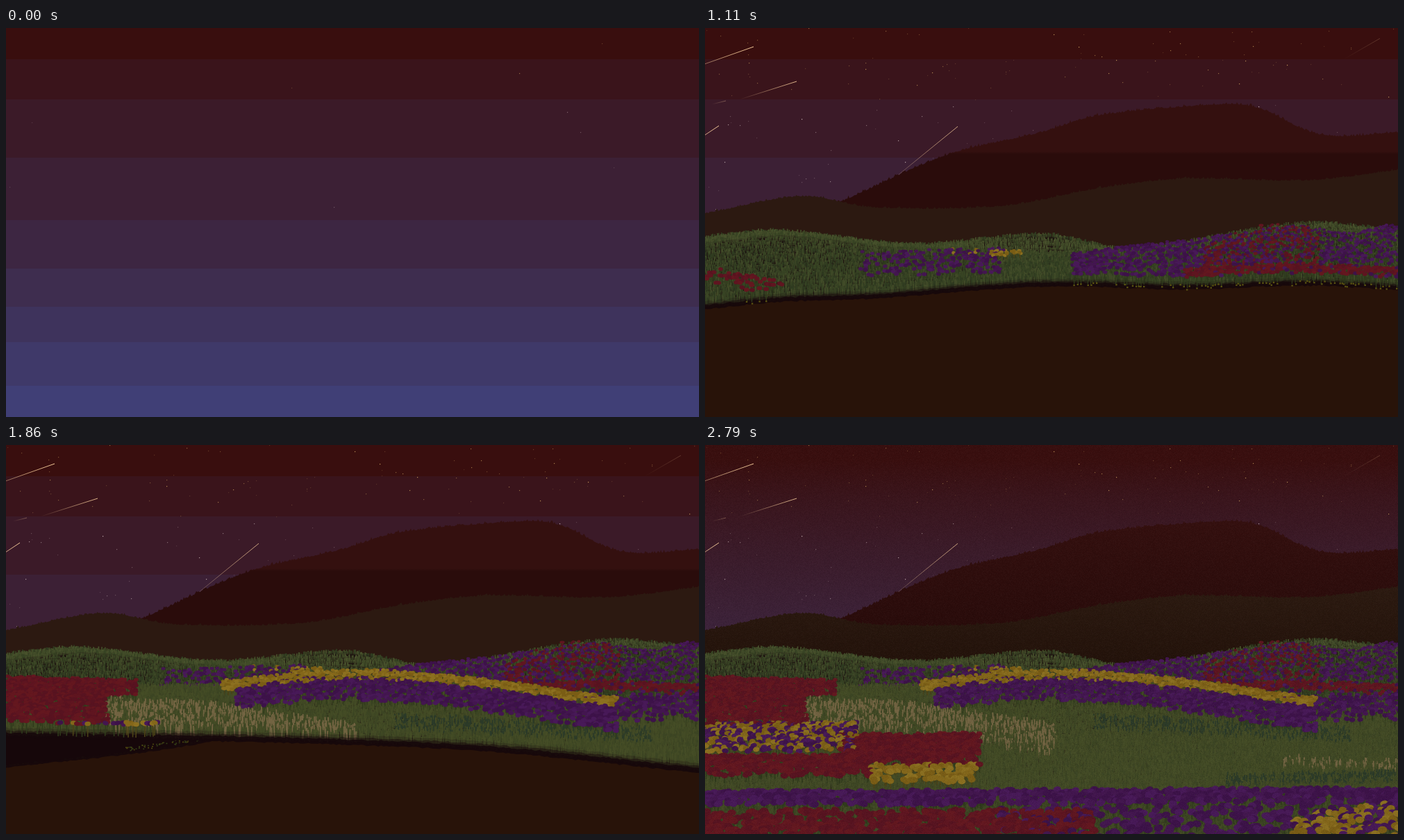
An HTML page with a canvas that plays this animation: 998x561 px, repeating every 9 s.

```html
<!DOCTYPE html>
<html lang="en">
<head>
<meta charset="utf-8">
<title>Night meadow</title>
<style>
html, body { margin: 0; width: 100%; height: 100%; overflow: hidden; background: #281309; }
canvas { display: block; width: 998px; height: 561px; }
</style>
</head>
<body>
<canvas id="stage" width="998" height="561"></canvas>
<script>
const W = 998, H = 561, LOOP = 9000, TICK = 30, LAST = 93, ROW = 15;

function layer(w, h) {
  const c = document.createElement('canvas');
  c.width = w;
  c.height = h;
  return c;
}
const ctx = document.getElementById('stage').getContext('2d');
const land = layer(W, H), g = land.getContext('2d');

function rng(seed) {
  let a = seed * 7919 + 17;
  return () => {
    a = (a + 0x6D2B79F5) | 0;
    let t = Math.imul(a ^ (a >>> 15), 1 | a);
    t = (t + Math.imul(t ^ (t >>> 7), 61 | t)) ^ t;
    return ((t ^ (t >>> 14)) >>> 0) / 4294967296;
  };
}
const lerp = (a, b, k) => a + (b - a) * k;

// Smooth line through a few [x, y] points
function line(...p) {
  const n = p.length - 1;
  const slope = p.map((_, i) => {
    const a = p[Math.max(0, i - 1)], b = p[Math.min(n, i + 1)];
    return (b[1] - a[1]) / (b[0] - a[0]);
  });
  return x => {
    let i = 0;
    while (i < n - 1 && x > p[i + 1][0]) i++;
    const [x0, y0] = p[i], [x1, y1] = p[i + 1], d = x1 - x0;
    const k = Math.max(0, Math.min(1, (x - x0) / d)), q = 1 - k;
    return q * q * (1 + 2 * k) * y0 + k * k * (3 - 2 * k) * y1
      + d * k * q * (q * slope[i] - k * slope[i + 1]);
  };
}

function below(top, fuzz, seed) {
  const r = rng(seed), path = new Path2D();
  path.moveTo(-2, H);
  for (let x = -2; x <= W + 2; x += 1.5) path.lineTo(x, top(x) - r() * r() * fuzz);
  path.lineTo(W + 2, H);
  return path;
}

/* ---------- sky and far hills ---------- */
const EDGES = [0, 45, 103, 187, 277, 347, 402, 453, 516, H];
const bandColor = i => `rgb(${57 + 0.9 * i},${14 + 6.1 * i},${14 + 13 * i})`;

const mountain = below(line([0, 330], [195, 251], [350, 183], [480, 152], [560, 128],
  [690, 114], [790, 114], [885, 154], [1000, 151]), 5, 3);
const ridge = below(line([0, 268], [140, 243], [240, 259], [430, 257], [570, 231],
  [690, 218], [870, 220], [1000, 205]), 4, 4);

const starRand = rng(11);
const stars = Array.from({ length: 190 }, () => ({
  x: Math.floor(starRand() * W),
  y: Math.floor(starRand() * 280),
  a: 0.15 + 0.65 * starRand() ** 2
}));

// head, tail, strength
const METEORS = [
  [30, 105, 10, 110, 0.35],
  [20, 141, -60, 194, 0.95],
  [364, 142, 250, 235, 0.75],
  [607, 236, 525, 300, 0.4],
  [95, 274, -40, 342, 0.8],
  [70, 27, -60, 73, 0.95],
  [132, 77, 50, 103, 0.85],
  [972, 15, 920, 45, 0.2]
];

function fade(x0, y0, x1, y1, ...colors) {
  const s = ctx.createLinearGradient(x0, y0, x1, y1);
  colors.forEach((c, i) => s.addColorStop(i / (colors.length - 1), c));
  return s;
}

function drawSky(step) {
  const t = step * TICK, done = step === LAST;
  const smooth = ctx.createLinearGradient(0, 0, 0, H);
  for (let i = 0; i < EDGES.length - 1; i++) {
    smooth.addColorStop((EDGES[i] + EDGES[i + 1]) / 2 / H, bandColor(i));
    ctx.fillStyle = bandColor(i);
    ctx.fillRect(0, EDGES[i], W, H);
  }
  if (done) {
    ctx.fillStyle = smooth;
    ctx.fillRect(0, 0, W, H);
  }
  for (const { x, y, a } of stars.slice(0, 9 + step * 10)) {
    ctx.fillStyle = `rgba(${y < 110 ? '235,190,110' : '225,205,205'},${a})`;
    ctx.fillRect(x, y, 1.2, 1.2);
  }
  ctx.lineWidth = 1;
  METEORS.forEach(([x0, y0, x1, y1, a], i) => {
    if (t < 90 + i * 70) return;
    const c = y0 < 200 ? '255,212,160' : '230,210,225';
    ctx.strokeStyle = fade(x0, y0, x1, y1, `rgba(${c},${a})`, `rgba(${c},0)`);
    ctx.beginPath();
    ctx.moveTo(x0, y0);
    ctx.lineTo(x1, y1);
    ctx.stroke();
  });
  if (t >= 630) {
    ctx.fillStyle = done ? fade(0, 112, 0, 260, '#340f0e', '#290b0a') : fade(0, 178, 0, 182, '#34100f', '#2a0c0b');
    ctx.fill(mountain);
  }
  if (t >= 720) {
    ctx.fillStyle = done ? fade(0, 205, 0, 310, '#2c1a10', '#23120a') : '#2c1911';
    ctx.fill(ridge);
  }
}

/* ---------- meadow ---------- */
// A patch hangs down by depth from a line through its points
function patch(kind, density, depth, ...points) {
  return { kind, density, depth, top: line(...points), x0: points[0][0], x1: points[points.length - 1][0] };
}

const crest = line([0, 308], [100, 298], [300, 319], [490, 304], [610, 325], [860, 287], [1000, 298]);
const gapEnd = line([0, 460], [200, 438], [480, 396], [700, 403], [1000, 420]);
const bank = line([0, 394], [200, 379], [480, 350], [700, 357], [875, 384], [1000, 400]);

// Each hill sweeps its front row through the lines in keys
const HILLS = [
  {
    keys: [
      [810, crest],
      [870, line([0, 316], [110, 305], [280, 322], [600, 331], [700, 328], [870, 301], [1000, 306])],
      [1275, gapEnd]
    ],
    grass: ['#48522c', '#414b28', '#374323', '#2f3b20'],
    deepen: true,
    patches: [
      patch('R', 0.85, 15, [690, 348], [840, 339], [1000, 346]),
      patch('R', 0.3, 55, [715, 318], [800, 284], [885, 288]),
      patch('R', 0.5, 24, [0, 343], [112, 364]),
      patch('Y', 0.3, 10, [355, 318], [455, 321]),
      patch('P', 0.4, 36, [225, 322], [430, 317]),
      patch('P', 0.45, 90, [530, 324], [760, 296], [860, 284], [930, 295], [1000, 276])
    ]
  },
  {
    keys: [
      [1290, bank],
      [1380, line([0, 403], [200, 392], [480, 367], [700, 372], [850, 386], [1000, 410])]
    ],
    grass: ['#434c26', '#3d4724', '#384221'],
    patches: [
      patch('T', 0.7, 22, [860, 374], [1000, 372]),
      patch('Y', 0.9, 13, [0, 375], [200, 360], [480, 332], [700, 339], [875, 366])
    ]
  },
  {
    keys: [
      [1440, line([0, 349], [300, 355], [500, 339], [700, 355], [880, 381], [1000, 378])],
      [1860, line([0, 417], [400, 424], [700, 437], [1000, 468])],
      [2370, line([0, 524], [1000, 522])]
    ],
    grass: ['#454d26', '#434b25', '#404824', '#3c4523'],
    patches: [
      patch('W', 0.25, 44, [145, 364], [300, 372], [505, 402]),
      patch('W', 0.13, 14, [830, 450], [1000, 455]),
      patch('T', 0.45, 22, [560, 385], [930, 404]),
      patch('T', 0.5, 16, [750, 473], [1000, 468]),
      patch('Y', 0.9, 16, [310, 338], [500, 322], [700, 336], [880, 364]),
      patch('P', 0.8, 34, [332, 345], [500, 334], [700, 352], [880, 380]),
      patch('P', 0.5, 40, [835, 357], [1000, 358]),
      patch('R', 1, 72, [0, 332], [146, 332]),
      patch('R', 1, 28, [140, 332], [188, 332]),
      patch('M', 0.9, 42, [0, 401], [218, 399]),
      patch('R', 0.9, 30, [0, 447], [240, 447]),
      patch('Y', 0.5, 26, [237, 460], [392, 460]),
      patch('R', 1, 48, [190, 417], [395, 415])
    ]
  },
  {
    keys: [
      [2400, line([0, 527], [1000, 522])],
      [2760, line([0, 604], [1000, 604])]
    ],
    grass: ['#434b24', '#3d4623', '#384121'],
    patches: [
      patch('Y', 0.4, 80, [850, 534], [1000, 514]),
      patch('P', 0.9, 30, [0, 490], [1000, 486]),
      patch('R', 0.5, 80, [0, 526], [560, 526]),
      patch('P', 0.25, 80, [420, 520], [1000, 518])
    ]
  }
];
const BLOOM = {
  P: ['#43164f', '#3d1249', '#481958'],
  R: ['#5f1520', '#581320', '#64171f'],
  Y: ['#84671a', '#7a5d15', '#8c7020']
};
const TINT = { W: '#736442', T: '#2b3a28' };

// Patches thin out toward their lower edge
function pick(patches, x, y, r) {
  for (const p of patches) {
    if (x < p.x0 || x > p.x1) continue;
    const k = (y - p.top(x)) / p.depth;
    if (k >= 0 && k <= 1 && r() < p.density * (1 - 0.6 * k * k)) return p.kind;
  }
}

function front(keys, t) {
  let i = 0;
  while (i < keys.length - 2 && t > keys[i + 1][0]) i++;
  const [t0, a] = keys[i], [t1, b] = keys[i + 1], k = (t - t0) / (t1 - t0);
  return x => lerp(a(x), b(x), k);
}

const tall = y => 8 + Math.max(0, y - 290) * 0.05;

function drawGrass(hill, t, base, r) {
  const tints = hill.patches.filter(p => TINT[p.kind]);
  const n = hill.grass.length, blades = {};
  const deep = hill.deepen ? Math.min(1.5, (t - hill.keys[0][0]) / 80) : 0;
  for (let x = -2; x < W + 2; x += 1.5) {
    const y = base(x), h = tall(y), kind = pick(tints, x, y - h, r);
    const shade = Math.min(n - 1, Math.floor(r() * (deep ? 2 : n) + deep));
    const p = blades[TINT[kind] || hill.grass[shade]] ??= new Path2D();
    const len = h * (0.65 + r() * 0.5 + (kind === 'W' ? 0.25 : 0));
    p.moveTo(x, y + r() * 3);
    p.lineTo(x + (r() - 0.5) * 2.5, y - len);
  }
  g.lineWidth = 1.8;
  for (const c in blades) {
    g.strokeStyle = c;
    g.stroke(blades[c]);
  }
}

// Roots fade to black
function drawRoots(base, r) {
  const h = tall(base(500));
  g.lineWidth = h * 0.5;
  for (const [lift, a] of [[0.4, 0.2], [0.15, 0.5], [-0.05, 0.9]]) {
    g.strokeStyle = `rgba(22,7,10,${a})`;
    g.beginPath();
    for (let x = -4; x <= W + 4; x += 4) g.lineTo(x, base(x) - lift * h + r() * 2);
    g.stroke();
  }
}

function drawBlooms(hill, base, r) {
  const patches = hill.patches.filter(p => !TINT[p.kind]);
  for (let x = -4; x < W + 4;) {
    const y = base(x) + (r() - 0.5) * 5, top = y - tall(y) * 1.3;
    const size = 2.1 + Math.max(0, top - 290) * 0.013;
    let kind = pick(patches, x + (r() - 0.5) * size, top, r);
    if (kind === 'M') kind = r() < 0.5 ? 'Y' : 'P';
    if (kind) {
      g.strokeStyle = kind === 'Y' ? '#4a4217' : '#2f3a1b';
      g.lineWidth = size * 0.45;
      g.beginPath();
      g.moveTo(x, top);
      g.lineTo(x + (r() - 0.5) * 2, y);
      g.stroke();
      if (hill.deepen) {
        g.fillStyle = '#5a5310';
        g.fillRect(x - 1, y - 2 + r() * 4, 2.4, 2.2);
      }
      g.fillStyle = BLOOM[kind][Math.floor(r() * 3)];
      g.beginPath();
      g.ellipse(x, top, size * 1.2, size * 0.9, (r() - 0.5) * 0.6, 0, 7);
      g.fill();
    }
    x += size * (0.7 + r() * 1.2);
  }
}

function drawRow(hill, t) {
  const r = rng(t), base = front(hill.keys, t);
  drawGrass(hill, t, base, r);
  drawRoots(base, r);
  drawBlooms(hill, base, r);
}

function drawSoil() {
  g.fillStyle = '#281309';
  g.fill(below(crest, 0, 5));
}

// Dark hollow between the first two hills
function drawGap() {
  const r = rng(21);
  g.fillStyle = '#16070a';
  g.beginPath();
  for (let x = 0; x <= W; x += 2) g.lineTo(x, bank(x) - 4);
  for (let x = W; x >= 0; x -= 2) g.lineTo(x, gapEnd(x) + r() * 3);
  g.fill();
  for (let i = 0; i < 300; i++) {
    const x = 170 + r() * 515;
    g.fillStyle = r() < 0.5 ? '#4d470f' : '#333b17';
    g.fillRect(x, gapEnd(x) - r() * 7, 2, 1.6);
  }
}

const jobs = [[810, drawSoil], [1290, drawGap]];
for (const hill of HILLS) {
  const end = hill.keys[hill.keys.length - 1][0];
  for (let t = hill.keys[0][0]; t <= end; t += ROW) jobs.push([t, () => drawRow(hill, t)]);
}
jobs.sort((a, b) => a[0] - b[0]);

/* ---------- film grain ---------- */
const tile = layer(256, 256);
{
  const c = tile.getContext('2d'), img = c.createImageData(256, 256), r = rng(31);
  for (let i = 0; i < img.data.length; i += 4) {
    const v = r() < 0.5 ? 130 : 0;
    img.data.fill(v, i, i + 3);
    img.data[i + 3] = r() * (v ? 10 : 22);
  }
  c.putImageData(img, 0, 0);
}
const grain = ctx.createPattern(tile, 'repeat');

/* ---------- clock ---------- */
const start = performance.now();
let shown = -1, next = 0;

function frame() {
  const t = (performance.now() - start) % LOOP;
  const step = Math.min(LAST, Math.floor(t / TICK));
  if (step !== shown) {
    if (step < shown) {
      g.clearRect(0, 0, W, H);
      next = 0;
    }
    shown = step;
    while (next < jobs.length && jobs[next][0] <= step * TICK) jobs[next++][1]();
    drawSky(step);
    ctx.drawImage(land, 0, 0);
    if (step === LAST) {
      ctx.fillStyle = grain;
      ctx.fillRect(0, 0, W, H);
    }
  }
  requestAnimationFrame(frame);
}
frame();
</script>
</body>
</html>
```
